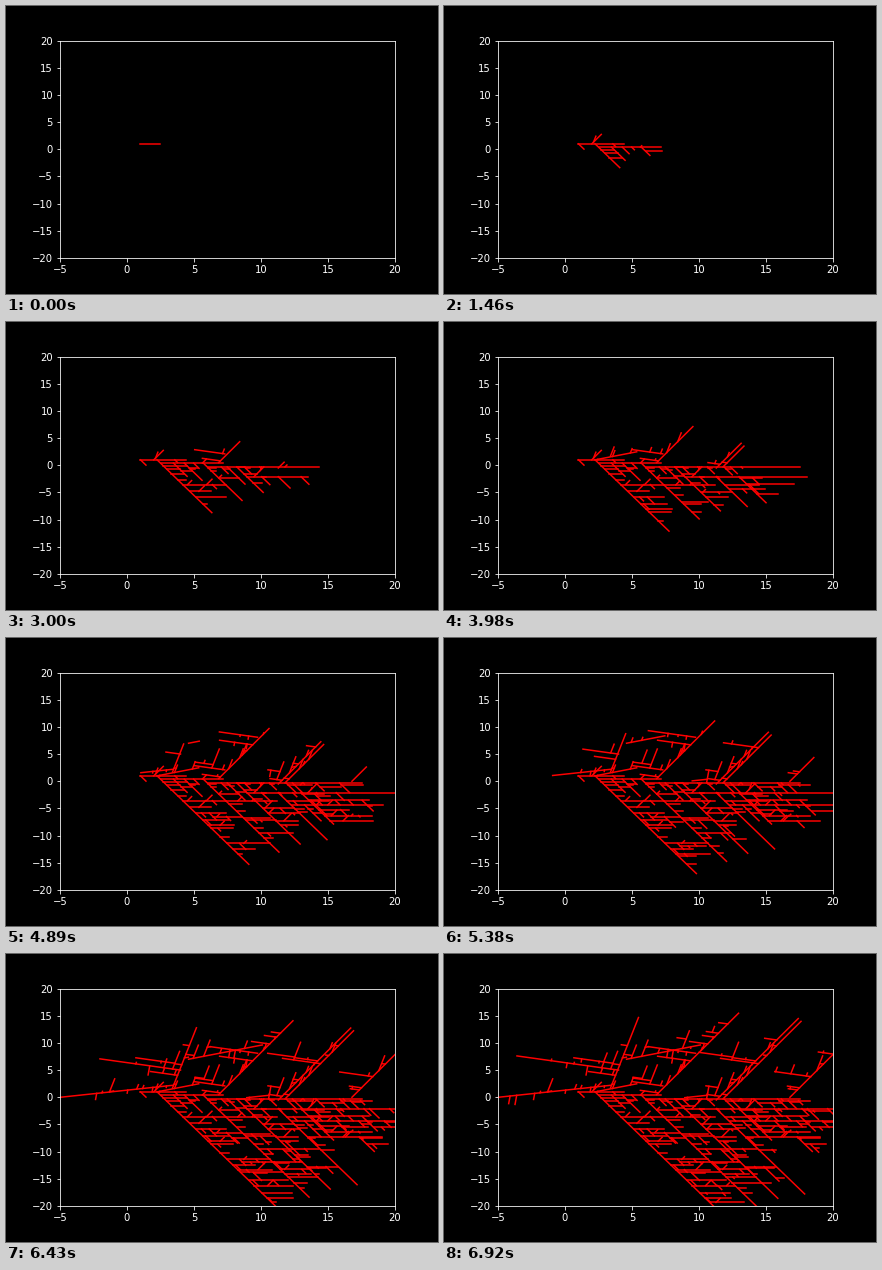
Write a matplotlib script that moves like this. It is 432 by 288 pixels and loops after 6990 ms.

```python
import random

import matplotlib.pyplot as plt
import numpy as np
from matplotlib.animation import FuncAnimation
from matplotlib.collections import LineCollection

LOOP_MS, TICK_MS = 6990, 30
HOLD_MS, STEP_MS = 200, 70
LEFT, RIGHT, LOW, HIGH = -5, 20, -20, 20
ASPECT = 0.41  # screen height of a y unit relative to an x unit

# tip velocity per second, spacing of side cracks, kinds they may take
KINDS = {
    "right": ((4.6, 0), 1.0, ("deep", "deep", "deep", "rise")),
    "deep": ((1.46, -3.47), 0.62, ("right",)),
    "rise": ((1.45, 3.55), 0.8, ("left", "left", "steep")),
    "left": ((-3.2, 1.1), 0.9, ("steep", "drop")),
    "steep": ((0.62, 3.85), 0.8, ("left", "ramp")),
    "ramp": ((4.2, 2.0), 0.9, ("steep", "drop")),
    "back": ((-4.0, -1.05), 0.8, ("steep", "drop")),
    "drop": ((-0.3, -4.0), 0.8, ("back",)),
}

# main cracks: kind, x, y, birth, life, pace
MAIN = [
    ("right", 1, 1, -0.326, 0.76, 1),
    ("right", 2.55, 0.4, 0.25, 1.05, 1),
    ("right", 6.05, -0.3, 1.2, 2.5, 1),
    ("right", 8.95, -2.1, 2.0, 9, 1),
    ("right", 12.3, -4.35, 3.4, 9, 1),
    ("deep", 2.25, 1, 0.2, 9, 1),
    ("deep", 5.7, 0.4, 1.02, 9, 1),
    ("deep", 8.2, -0.3, 1.65, 9, 1),
    ("deep", 11.3, -2.1, 2.4, 9, 1),
    ("deep", 13, -2.1, 2.6, 1.7, 1),
    ("rise", 6.85, 0.5, 1.65, 9, 0.8),
    ("rise", 11.3, -0.5, 2.7, 9, 1),
    ("rise", 11.8, -0.3, 2.9, 9, 1),
    ("rise", 16.8, 0, 4.15, 9, 1),
    ("steep", 3.4, 1.7, 3.55, 9, 1),
    ("left", 7.3, 2.1, 2.3, 0.75, 1),
    ("left", 9.75, 8.1, 4.0, 1.1, 1),
    ("left", 4, 5, 4.55, 9, 1),
    ("ramp", 2.25, 1, 3.1, 0.8, 1),
    ("ramp", 4.6, 7, 4.7, 1.33, 1),
    ("back", 3.4, 2.2, 4.3, 9, 1),
]

rng = random.Random(12)


class Crack:
    def __init__(self, kind, x, y, birth, life, pace=1, parent=None):
        velocity, self.gap, self.choices = KINDS[kind]
        self.start = self.tip = np.array([x, y], float)
        self.velocity = np.array(velocity) * pace
        self.birth, self.end = birth, birth + life
        self.parent = parent
        self.kids = 0

    def grow(self, t, others):
        x, y = self.tip
        inside = LEFT - 1 < x < RIGHT + 1 and LOW - 1 < y < HIGH + 1
        if not (self.birth < t <= self.end and inside):
            return
        goal = self.start + self.velocity * (t - self.birth)
        if self.parent:  # side cracks end where they meet another crack
            reach = first_hit(self.tip, goal, others, (self, self.parent))
            if reach < 1:
                goal = self.tip + reach * (goal - self.tip)
                self.end = t
        self.tip = goal

    def sprout(self, t):
        span = self.tip - self.start
        slots = np.hypot(span[0], span[1] * ASPECT) / self.gap
        if self.kids + 1 > slots or rng.random() > 0.25:
            return None
        x, y = self.start + span * (self.kids + rng.random()) / slots
        self.kids += 1
        life = 0.1 + 0.9 * rng.random() ** 1.5
        return Crack(rng.choice(self.choices), x, y, t, life, parent=self)


def cross(a, b):
    return a[..., 0] * b[..., 1] - a[..., 1] * b[..., 0]


def first_hit(p, q, others, skip):
    """Fraction of p-q covered before it meets another crack, 1 if free."""
    rest = [c for c in others if c not in skip]
    a = np.array([c.start for c in rest])
    d = np.array([c.tip for c in rest]) - a
    r = q - p
    area = cross(r, d)
    area[area == 0] = 1e-12
    s, u = cross(a - p, d) / area, cross(a - p, r) / area
    hit = (s > 0) & (s < 1) & (u >= 0) & (u <= 1)
    return s[hit].min() if hit.any() else 1


def simulate():
    """Crack segments after every growth step."""
    cracks = [Crack(*row) for row in MAIN]
    history = []
    for step in range((LOOP_MS - HOLD_MS) // STEP_MS + 1):
        t = (HOLD_MS + STEP_MS * (step - 1)) / 1000 if step else 0
        live = [c for c in cracks if c.birth < t]
        for c in live:
            c.grow(t, live)
        cracks += [kid for kid in [c.sprout(t) for c in live] if kid]
        history.append([(c.start, c.tip) for c in live])
    return history


growth = simulate()

plt.style.use("dark_background")
fig, ax = plt.subplots(figsize=(6, 4), dpi=72)
fig.subplots_adjust(left=0.125, right=0.9, bottom=0.125, top=0.88)
fig.set_facecolor("black")
ax.set(xlim=(LEFT, RIGHT), ylim=(LOW, HIGH),
       xticks=range(LEFT, RIGHT + 1, 5), yticks=range(LOW, HIGH + 1, 5))
web = LineCollection([], colors="red", linewidths=1.5, capstyle="projecting")
ax.add_collection(web, autolim=False)


def draw(i):
    ms = (i + 1) * TICK_MS - 1
    step = max(0, (ms - HOLD_MS) // STEP_MS + 1)
    web.set_segments(growth[step])
    return [web]


anim = FuncAnimation(fig, draw, frames=LOOP_MS // TICK_MS, interval=TICK_MS,
                     repeat=True, repeat_delay=0)
plt.show()
```
